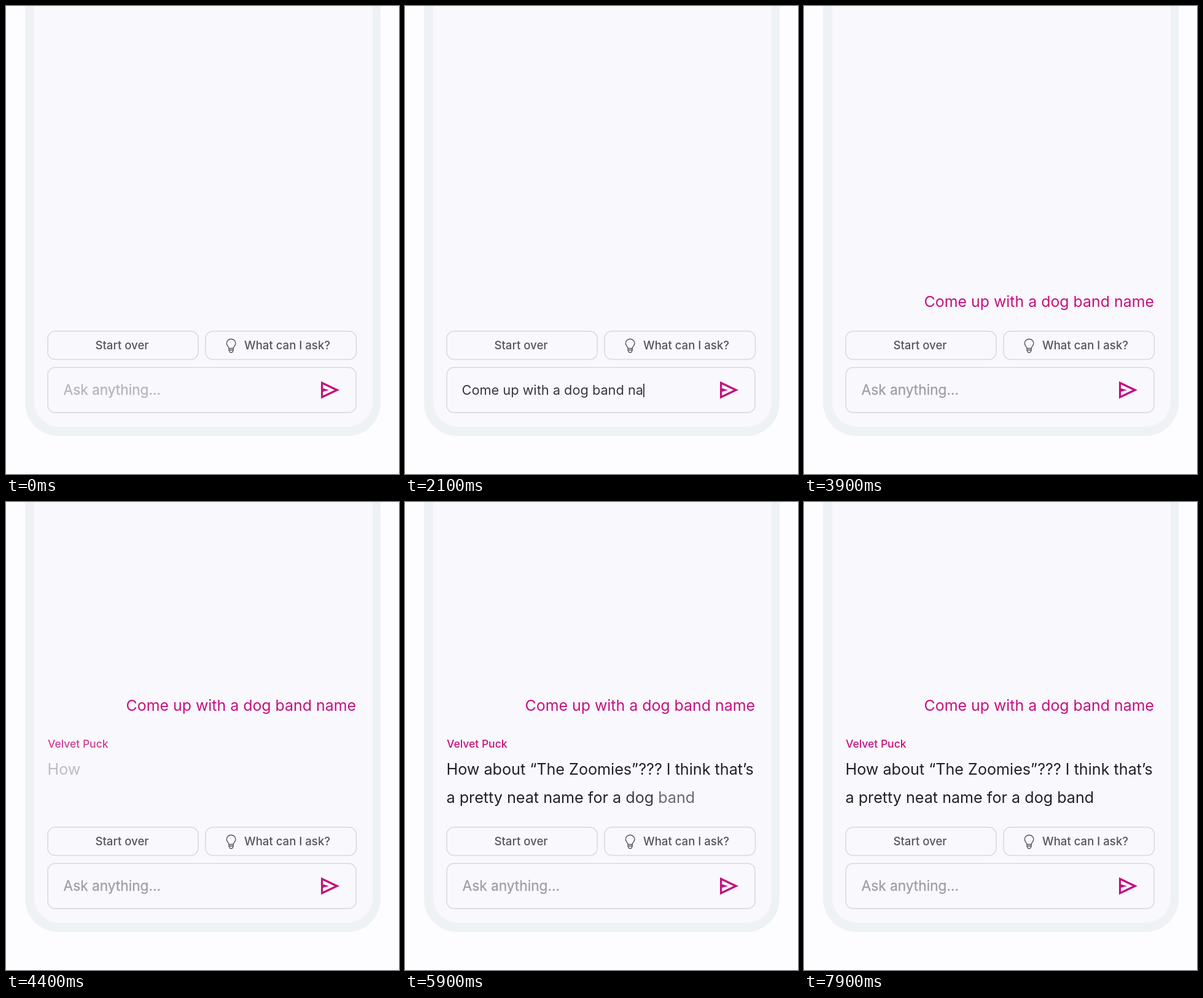
Write an HTML page that moves like this. It is 640 px wide and 762 px high and loops after 8000 ms.

```html
<!DOCTYPE html>
<html lang="en">
<head>
<meta charset="utf-8">
<title>Chat prompt</title>
<style>
  html, body { margin: 0; width: 100%; height: 100%; overflow: hidden; background: #fdfcff; }
  svg { display: block; width: 100vw; height: 100vh; }
  text {
    font-family: Inter, "Open Sans", sans-serif;
    font-optical-sizing: none;
    white-space: pre;
  }
  .box { fill: #f9f8fd; stroke: #d8d8df; stroke-width: 1.5; }
  .button { font-size: 18.6px; font-weight: 500; fill: #56545c; }
  .hint { font-size: 22.7px; fill: #a09ea5; stroke: #a09ea5; stroke-width: .3; }
  .typed { font-size: 21.75px; fill: #39373f; }
  .message { font-size: 24.9px; }
  .answer { font-size: 25.15px; fill: #222027; }
  .pink { fill: #c5107f; }
  .label { font-size: 17.5px; font-weight: 500; }
  .bulb { fill: none; stroke: #56545c; stroke-width: 1.4; stroke-linecap: round; stroke-linejoin: round; }
</style>
</head>
<body>
<svg viewBox="0 0 640 762">
  <defs>
    <radialGradient id="glow">
      <stop offset="0" stop-color="#cadffb"/>
      <stop offset="1" stop-color="#b4d1fa"/>
    </radialGradient>
  </defs>
  <rect width="640" height="762" fill="#fdfcff"/>
  <rect x="31" y="-100" width="579" height="800" rx="54" fill="#eff2f5"/>
  <rect x="46" y="-100" width="551" height="785" rx="40" fill="#f9f8fd"/>

  <text id="message" class="message pink" x="570" text-anchor="end">Come up with a dog band name</text>
  <text id="label" class="label pink" x="68" y="400">Velvet Puck</text>
  <g id="answer" class="answer"></g>

  <rect class="box" x="68" y="529.5" width="245" height="46" rx="12"/>
  <text class="button" x="189" y="559" text-anchor="middle">Start over</text>
  <rect class="box" x="325" y="529.5" width="245.5" height="46" rx="12"/>
  <path class="bulb" d="M363 557.5 C363 554.5 359.3 553.5 359.3 549.3 A7.3 7 0 0 1 373.9 549.3 C373.9 553.5 370.2 554.5 370.2 557.5 Z
    M363 560.3 H370.2 M364.3 563.3 Q366.6 564.8 368.9 563.3 M363 557.5 V560.3 L364.3 563.3 M370.2 557.5 V560.3 L368.9 563.3"/>
  <text class="button" x="388" y="559">What can I ask?</text>

  <rect class="box" x="68" y="588.5" width="502" height="73.5" rx="12"/>
  <text id="hint" class="hint" x="93.5" y="633">Ask anything...</text>
  <text id="typed" class="typed" x="92.5" y="633"></text>
  <rect id="caret" y="615" width="1.8" height="22" fill="#39373f"/>
  <circle id="tap" cx="523.3" cy="626" r="26" fill="url(#glow)" stroke="#6ea2f6" stroke-width="1.8"/>
  <path id="send" class="pink" fill-rule="evenodd"
    d="M513 611 L543 625.2 L513 639.5 Z M516.2 616.2 L535 625.2 L516.2 634.3 V628 L526 625.2 L516.2 622.5 Z"/>
</svg>
<script>
const LOOP = 8000;
const PROMPT = "Come up with a dog band name";
const LINES = ["How about “The Zoomies”??? I think that’s", "a pretty neat name for a dog band"];
const TYPE_START = 250, TYPE_STEP = 70, SEND_TIME = 3350;
const WORD_START = 4350, WORD_STEP = 100, WORD_FADE = 500;

const el = id => document.getElementById(id);
const [message, label, answer, hint, typed, caret, tap, send] =
  ["message", "label", "answer", "hint", "typed", "caret", "tap", "send"].map(el);

const clamp = v => Math.min(1, Math.max(0, v));
const ramp = (t, from, to) => clamp((t - from) / (to - from));
const easeOut = p => 1 - (1 - p) ** 3;
const easeInOut = p => p < .5 ? 4 * p ** 3 : 1 - (2 - 2 * p) ** 3 / 2;

function svg(tag, attrs, parent) {
  const node = document.createElementNS("http://www.w3.org/2000/svg", tag);
  for (const key in attrs) node.setAttribute(key, attrs[key]);
  return parent.appendChild(node);
}

const words = LINES.flatMap((line, row) => {
  const text = svg("text", { x: 67.5, y: 443.5 + row * 46 }, answer);
  return line.split(" ").map(word => {
    const span = svg("tspan", {}, text);
    span.textContent = word + " ";
    return span;
  });
});

function drawInput(t) {
  const count = Math.floor(clamp((t - TYPE_START) / TYPE_STEP / PROMPT.length) * PROMPT.length + 1e-6);
  const sent = t >= SEND_TIME;
  typed.textContent = sent ? "" : PROMPT.slice(0, count);
  hint.style.opacity = sent ? ramp(t, SEND_TIME, 3650) : .75 * (1 - ramp(t, 50, TYPE_START));

  caret.style.opacity = t >= TYPE_START && t < 2500 ? 1 : 0;
  caret.setAttribute("x", 92.5 + (count ? typed.getComputedTextLength() : 0));

  const press = easeOut(ramp(t, 2650, 2900)) * (1 - ramp(t, 3150, SEND_TIME));
  tap.style.opacity = press;
  tap.setAttribute("r", 20 + 6 * press);
  send.style.opacity = 1 - .15 * press;
}

function drawChat(t) {
  message.style.opacity = ramp(t, 3400, 3700);
  message.setAttribute("y", 489.5 - 149.5 * easeInOut(ramp(t, 4000, 4400)));
  label.style.opacity = ramp(t, 4200, 4450);
  words.forEach((word, i) => {
    const start = WORD_START + i * WORD_STEP;
    word.setAttribute("fill-opacity", easeOut(ramp(t, start, start + WORD_FADE)));
  });
}

const origin = performance.now();
function tick() {
  const t = (performance.now() - origin) % LOOP;
  drawInput(t);
  drawChat(t);
  requestAnimationFrame(tick);
}
tick();
</script>
</body>
</html>
```
